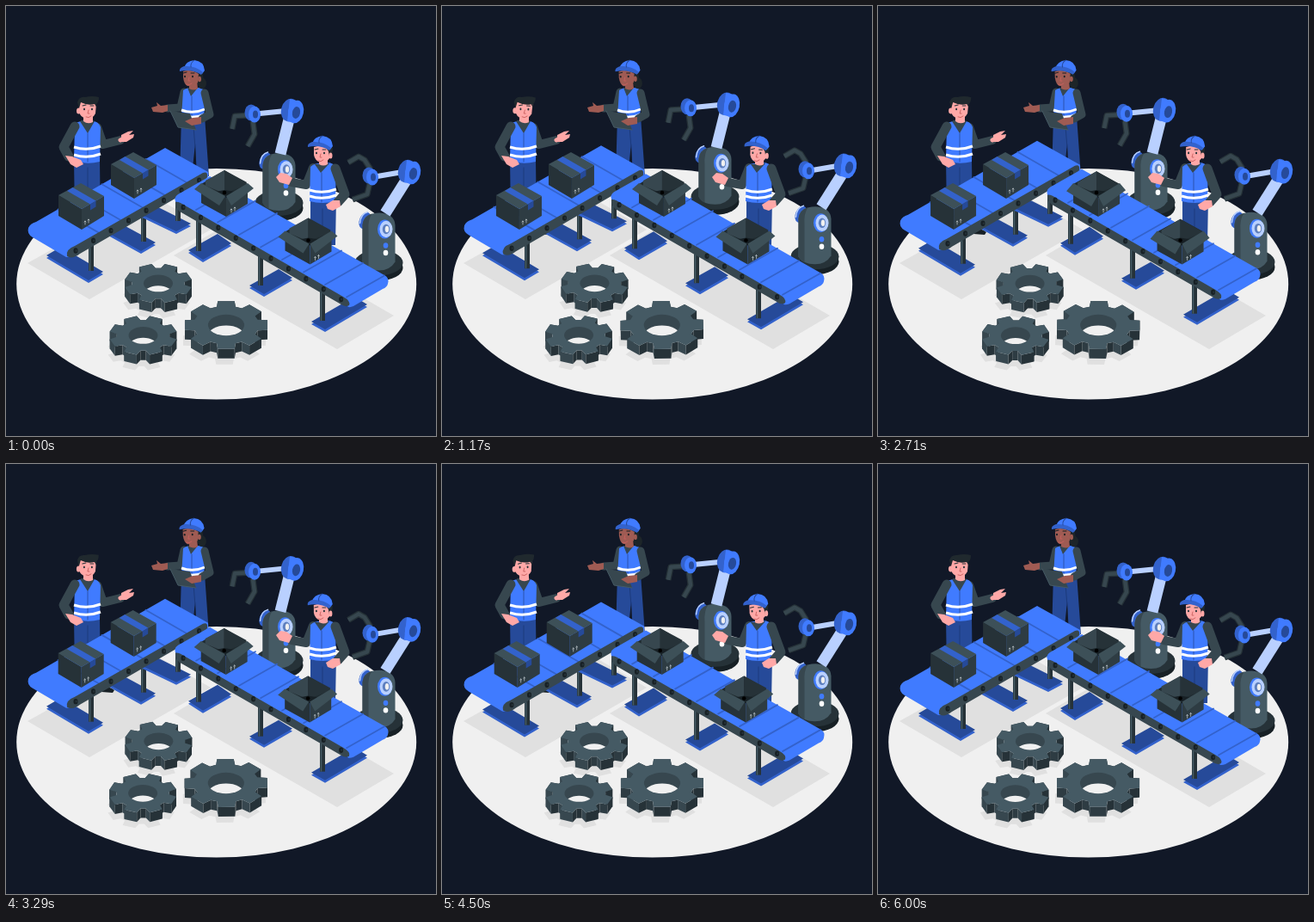
An HTML page with a canvas that plays this animation: 500x500 px, repeating every 6040 ms.

```html
<!DOCTYPE html>
<html lang="en">
<head>
<meta charset="utf-8">
<title>Factory line</title>
<style>
html, body { margin: 0; width: 100%; height: 100%; overflow: hidden; background: #111827; }
canvas { display: block; width: 500px; height: 500px; }
</style>
</head>
<body>
<canvas id="stage" width="500" height="500"></canvas>
<script>
const c = document.getElementById('stage').getContext('2d');
const LOOP = 6040, TAU = Math.PI * 2;
const BLUE = '#407bff', MID = '#3362cc', NAVY = '#264a99', PALE = '#b9d0ff';
const INK = '#263238', SLATE = '#37474f', STEEL = '#455a64', BLACK = '#172025';
const DUSK = '#2e3c43', CARD = '#3d5058';
const PINK = '#ffa8a7', BROWN = '#9f5b53', FLOOR = '#f0f0f0', SHADE = '#e0e0e0';

const fill = (color, d) => { c.fillStyle = color; c.fill(new Path2D('M' + d + 'z')); };
const line = (color, width, d, cap = 'round') => {
  c.strokeStyle = color; c.lineWidth = width; c.lineCap = cap; c.lineJoin = 'round';
  c.stroke(new Path2D('M' + d));
};
const oval = (color, x, y, rx, ry = rx, turn = 0) => {
  c.fillStyle = color; c.beginPath(); c.ellipse(x, y, rx, ry, turn, 0, TAU); c.fill();
};
const at = (x, y, draw, turn = 0) => {
  c.save(); c.translate(x, y); c.rotate(turn); draw(); c.restore();
};

function ground() {
  c.fillStyle = '#111827'; c.fillRect(0, 0, 500, 500);
  oval(FLOOR, 244.7, 323.3, 232.5, 134.3);
  fill(SHADE, '25,299 97,341 238,260 168,219');
  fill(SHADE, '195,290 385,399 451,360 262,251');
}

function gear(x, y, r, depth, phase) {
  const ring = [];
  for (let i = 0; i < 8; i++)
    for (const [a, k] of [[-.29, .78], [-.2, 1], [.2, 1], [.29, .78]]) {
      const t = phase + i * TAU / 8 + a;
      ring.push([x + Math.cos(t) * r * k, y + Math.sin(t) * r * k * .58]);
    }
  const shape = ring.join(' ');
  at(-2, depth + 7, () => fill(SHADE, shape));
  ring.map((p, i) => [p, ring[(i + 1) % ring.length]])
    .sort((a, b) => a[0][1] + a[1][1] - b[0][1] - b[1][1])
    .forEach(([p, q]) => fill(q[1] > p[1] ? INK : q[1] < p[1] - 2 ? SLATE : DUSK,
      [p, q, [q[0], q[1] + depth], [p[0], p[1] + depth]].join(' ')));
  fill(STEEL, shape);
  const hx = r * .43, hy = r * .25;
  oval(SLATE, x, y, hx, hy);
  c.save(); c.beginPath(); c.ellipse(x, y, hx, hy, 0, 0, TAU); c.clip();
  oval(FLOOR, x, y + depth * 1.15, hx, hy); c.restore();
}

function stand(plate, x, y, height) {
  at(0, 3, () => fill(MID, plate));
  fill(NAVY, plate);
  line(INK, 6, `${x},${y - height} V${y}`, 'butt');
  line(STEEL, 1.6, `${x - 1.5},${y - height} V${y}`, 'butt');
}

function rollers(n, x, y, dx, dy) {
  for (let i = 0; i < n; i++) {
    oval(BLACK, x + dx * i, y + dy * i, 2.5, 3.2);
    oval(INK, x + dx * i + .7, y + dy * i, 1, 1.4);
  }
}

function leftBelt() {
  stand('47,290 64,280 113,309 96,319', 99, 308, 30);
  stand('108,258 124,248 174,275 157,285', 160, 274, 30);
  stand('150,239 167,229 215,253 198,262', 200, 250, 30);
  fill(BLUE, '185,165 L235,193 L235,199 L82,285 Q77,293 70,292 L31,269 Q24,265 26,258 Q28,253 35,251');
  for (let i = 1; i < 6; i++)
    line(MID, 1.8, `${35 + 25.5 * i},${251 - 14.6 * i} l47,27`);
  fill(SLATE, '71,291 Q69,283 80,279 L229,194 Q235,192 234,199 L231,204 L86,288 Q77,295 71,291');
  rollers(8, 81, 284.5, 20.5, -11.7);
}

function rightBelt() {
  stand('212,284 246,265 262,276 229,295', 224, 285, 38);
  stand('283,325 317,306 333,316 300,335', 296, 325, 34);
  stand('355,367 405,338 420,347 371,376', 368, 366, 34);
  fill(BLUE, '200,219 L237,198 L440,313 Q446,316 444,323 Q443,327 438,329 L404,349 Q397,352 396,347 L198,229 Q194,223 200,219');
  for (let i = 0; i < 8; i++)
    line(MID, 1.8, `${221 + 25 * i},${237 + 14.5 * i} l44,-25`);
  fill(SLATE, '197,230 Q196,226 203,229 L392,338 Q401,343 399,348 Q395,351 388,346 L202,239 Q197,235 197,230');
  rollers(10, 206, 234, 20.4, 11.9);
}

function label(x, y) {
  line('#c7d0d4', .7, `${x},${y} v-4 m-1,1 l1,-1 l1,1 M${x + 4},${y - 2} v-4 m-1,1 l1,-1 l1,1`);
}

// Origin: the back corner of the lid.
function closedBox() {
  fill(INK, '-26,14 1,30 1,54 -26,38');
  fill(DUSK, '1,30 27,15 27,38 1,54');
  fill(CARD, '0,0 27,15 1,30 -26,14');
  fill(MID, '-16,9 -9.5,5 17.5,20.5 11,24.5');
  fill(NAVY, '11,24.5 17.5,20.5 17.5,27.5 11,31.5');
  label(5, 48);
}

// Origin: the back corner of the opening.
function openBox(dip) {
  fill(INK, '-27,16 2,32 2,54 -27,38');
  fill(DUSK, '2,32 27,17 27,39 2,54');
  fill('#202b30', `0,${dip * .5} 27,16 2,32 -27,16`);
  fill(SLATE, `0,${dip * .5} -22,${12 + dip} -22,18 0,27`);
  fill(INK, `0,${dip * .5} 26,${14 + dip} 24,18 0,27`);
  fill(BLACK, '0,23 12,25 2,32 -10,25');
  oval('#000', 0, 26, 2.3);
  fill(CARD, `-27,15 1,30 -6,${41 + dip * .4} -35,${22 + dip}`);
  fill(CARD, `27,15 2,30 8,${41 + dip * .4} 34,${21 + dip}`);
  label(8, 49);
}

// Origin: middle of the column top.
function robotBase() {
  oval(BLACK, 0, 63, 28, 15);
  oval(INK, 0, 57, 28, 15);
  oval(MID, -16, 8, 6.5, 10, .4);
  line(PALE, 1.5, '-22,11 Q-21,0 -13,-2');
  fill(STEEL, '-19,13 Q-18,-1 1,-1 Q18,0 19,13 L19,56 Q13,66 0,66 Q-14,66 -19,57');
  fill(SLATE, '-19,13 Q-18,3 -8,0 Q-13,7 -12,20 L-12,64 Q-18,61 -19,57');
  oval(BLUE, 7, 18, 8.5, 11);
  oval(PALE, 8.5, 18, 7.5, 9.7);
  oval('#5d7fbf', 8.5, 18, 4.2, 5.8);
  oval(FLOOR, 9.5, 18, 2.2, 3.8);
  oval(BLUE, 8, 37, 2.8, 3.2);
  oval('#fff', 8, 45.5, 2.8, 3.2);
}

function robotArm(sx, sy, hx, hy, wx, wy, claws) {
  line(PALE, 13, `${sx},${sy} L${hx - 4},${hy + 10}`, 'butt');
  line(PALE, 6, `${wx + 8},${wy} L${hx - 8},${hy}`, 'butt');
  for (const d of claws) { line(INK, 7, d, 'butt'); line(SLATE, 4.5, d, 'butt'); }
  oval(MID, hx - 3, hy - 1, 10, 13.5, .25);
  fill(BLUE, `${hx - 3},${hy - 14} L${hx + 5},${hy - 12} L${hx + 2},${hy + 14} L${hx - 6},${hy + 12}`);
  oval(BLUE, hx + 4, hy + 1, 9, 13.5, .2);
  oval(NAVY, hx + 4.5, hy + 2, 4.5, 7, .2);
  oval(MID, wx - 2, wy - 1, 7.5, 9.5);
  oval(BLUE, wx + 2, wy + 1, 7, 9.5);
  oval(NAVY, wx + 3, wy + 1, 3, 4.5);
}

function face(x, y, dark) {
  oval(dark, x - 5, y, 1, 1.3); oval(dark, x + 4, y, 1, 1.3);
  line(dark, 1, `${x - 7},${y - 4} l4,-1 M${x + 2},${y - 4} l4,0`);
  line('#c9605f', .9, `${x},${y + 1} l-1,4 l2,0 M${x - 3},${y + 9} q3,2 6,-1`);
}

function cap(x, y) {
  at(x, y, () => {
    fill(BLUE, '5,9 Q7,1 17,0 Q28,1 29,12 L26,16 Q18,8 5,9');
    fill(MID, '5,7 Q-1,9 0,13 Q14,10 25,17 L27,14 Q18,6 5,7');
    line(NAVY, 1, '17,0 Q12,3 13,8');
  });
}

function stripes(x1, x2, y, gap) {
  for (const k of [y, y + gap]) line('#fff', 3, `${x1},${k} Q${(x1 + x2) / 2},${k + 5} ${x2},${k - 1}`, 'butt');
}

function foreman(sway) {
  fill(BLACK, '111,259 Q118,257 126,263 L124,266 L111,265');
  fill(NAVY, '79,179 109,179 110,255 96,255 95,225 93,245 80,245');
  line('#1c3a7c', 1, '95,188 V222');
  line(SLATE, 10, '106,141 L113,161 L133,156');
  line(PINK, 5, '133,156 L141,152');
  fill(PINK, '134,150 L142,146 L148,145 L143,150 L149,149 L148,153 L140,158 L134,158');
  fill(BLUE, '80,137 Q87,132 96,134 Q107,132 110,141 L109,181 Q94,185 79,180');
  fill(SLATE, '86,134 L95,148 L103,134 L96,130');
  line(NAVY, .8, '95,148 V181');
  stripes(79, 110, 164, 9);
  line(SLATE, 11, '80,140 L67,164 L73,175');
  fill(PINK, '69,174 L77,175 L87,179 L90,184 L82,188 L75,184');
  at(95, 132, () => {
    fill(PINK, '-5,-7 6,-7 6,3 Q0,6 -5,2');
    fill(PINK, '-10,-20 Q0,-26 10,-19 L9,-7 Q6,-1 -1,-1 Q-9,-2 -10,-10');
    oval(PINK, -10.5, -10, 2.5, 3.5);
    fill('#20292e', '-10,-13 L-12,-20 Q-10,-27 -3,-26 Q5,-28 13,-26 Q13,-20 10,-18 L11,-13 L8,-18 Q0,-16 -8,-20');
    face(1, -12, INK);
  }, sway);
}

function inspector(sway) {
  fill(NAVY, '204,128 231,128 236,198 222,198 220,160 216,198 202,198');
  line('#1c3a7c', 1, '218,140 L220,165');
  line(SLATE, 9, '207,100 L203,118 L188,119');
  fill(BROWN, '188,115 L180,116 L175,112 L176,116 L169,118 L171,123 L182,124 L188,122');
  fill(BLUE, '206,98 Q213,93 221,95 Q231,94 232,102 L230,131 Q216,135 204,130');
  fill(SLATE, '211,95 L215,105 L223,95');
  line(NAVY, .8, '216,105 V130');
  stripes(204, 231, 121, 6);
  line(SLATE, 9, '231,101 L237,126 L228,131');
  fill(SLATE, '191,122 L214,125 L221,144 L200,141');
  line(STEEL, 1, '191,122 L200,141 L221,144');
  fill(BROWN, '208,134 L217,130 L227,129 L227,137 L216,139');
  at(217, 95, () => {
    oval('#1d2529', 11, -5, 5, 6.5);
    fill('#1d2529', '-9,-20 Q0,-28 11,-21 L13,-8 L5,-3 L-6,-12');
    fill(BROWN, '-4,-8 5,-8 6,1 Q1,4 -4,1');
    fill(BROWN, '-11,-19 Q-2,-22 7,-16 L6,-6 Q1,-1 -6,-2 Q-10,-4 -11,-12');
    oval(BROWN, 8, -10, 2, 3.2);
    face(-4, -13, BLACK);
    cap(-15, -32);
  }, sway);
}

function operator(sway) {
  fill(NAVY, '354,223 384,223 383,278 369,278 368,262 367,278 354,278');
  line('#1c3a7c', 1, '368,236 V262');
  line(SLATE, 10, '357,188 L349,208 L332,205');
  fill(PINK, '333,200 L326,195 L319,194 L314,199 L318,205 L329,208');
  fill(BLUE, '354,187 Q360,182 368,183 Q380,180 384,188 L383,227 Q368,231 353,227');
  fill(SLATE, '359,184 L366,194 L376,183');
  line(NAVY, .8, '367,194 V228');
  stripes(353, 384, 214, 7);
  line(SLATE, 11, '383,189 L394,219 L386,228');
  fill(PINK, '372,231 L380,226 L388,226 L389,233 L380,238 L374,236');
  at(368, 183, () => {
    fill(PINK, '-4,-9 6,-9 6,1 Q1,4 -4,1');
    fill(PINK, '-10,-19 Q0,-23 10,-17 L9,-7 Q5,-1 -2,-1 Q-9,-3 -10,-10');
    fill('#20292e', '3,-20 L12,-18 L11,-8 L8,-8 L7,-14');
    oval(PINK, 9.5, -9, 2, 3.5);
    face(-2, -12, INK);
    cap(-17, -32);
  }, sway);
}

function draw(now) {
  const p = now % LOOP / LOOP;
  const rise = n => (1 - Math.cos(TAU * n * p)) / 2;
  const wave = n => Math.sin(TAU * n * p);
  const lift = -8.5 * rise(1), hop = -8.2 * rise(2);
  const shake = 2 * Math.cos(TAU * 5 * p) * Math.min(1, 10 * p, 10 * (1 - p));
  const dip = 3 * Math.max(0, 1 - ((p - .37) / .17) ** 2);

  ground();
  at(0, hop, () => {
    at(317.5, 172, robotBase);
    robotArm(319, 172, 333, 122, 287, 125, ['284,127 L266,128 L263,143', '287,134 L289,149 L281,163']);
    at(433.5, 241.5, robotBase);
    robotArm(441, 241, 469, 193, 424, 198, ['424,190 L417,179 L410,175 L398,182', '423,206 L420,219 L403,225']);
  });
  inspector(-.025 * rise(3));
  foreman(.035 * wave(1));
  operator(.035 * wave(1));
  at(0, lift, leftBelt);
  at(0, lift, rightBelt);
  at(148 + shake, 170, closedBox);
  at(87 + shake, 206, closedBox);
  at(254 + shake, 191, () => openBox(dip));
  at(351.5 + shake, 246.5, () => openBox(dip));

  const turn = .03 * wave(2), slip = .7 * wave(2);
  gear(177 + slip, 322.5 - slip * .5, 39.5, 11, TAU / 16 + turn);
  gear(159.5 - slip, 383 - slip * .5, 39.5, 11, TAU / 16 - turn);
  gear(256 - slip * .5, 371, 49, 11, -turn);
  requestAnimationFrame(() => draw(performance.now()));
}
draw(performance.now());
</script>
</body>
</html>
```
